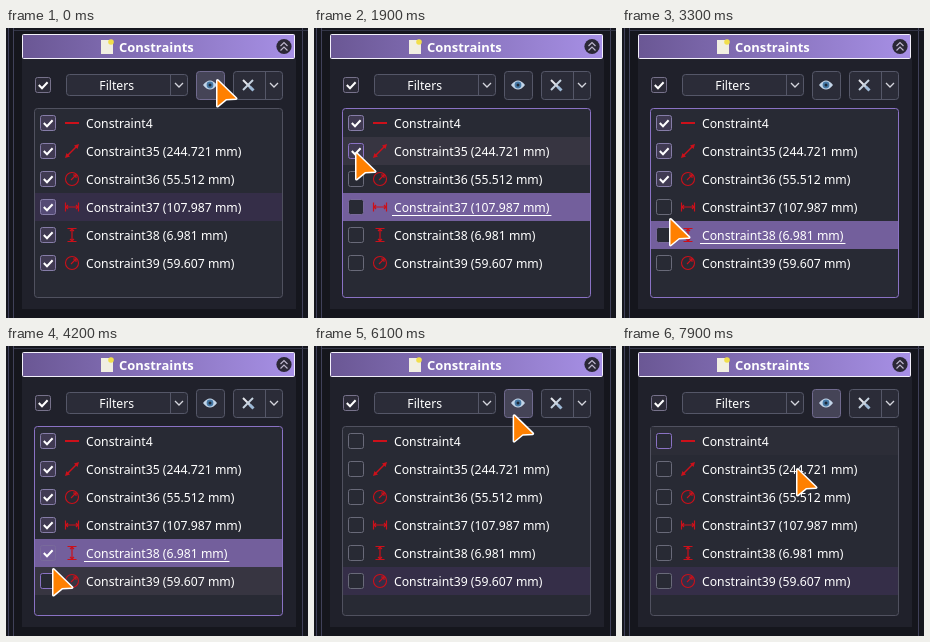
These frames come from a looping animation (302 by 290 pixels, 8 s). An HTML page with a canvas:

```html
<!DOCTYPE html>
<html>
<head>
<meta charset="utf-8">
<style>
html, body { margin: 0; width: 302px; height: 290px; overflow: hidden; background: #15161d; }
canvas { display: block; }
</style>
</head>
<body>
<canvas id="stage" width="302" height="290"></canvas>
<script>
const c = document.getElementById('stage').getContext('2d');
const LOOP = 8000, TOP = 81, ROW = 28, GLIDE = 300;
const FONT = '"Noto Sans", "Open Sans", sans-serif';
const RED = '#cc101a', ACCENT = '#8a72c4';

const rows = [
  { text: 'Constraint4', icon: 'line', on: 1500 },
  { text: 'Constraint35 (244.721 mm)', icon: 'distance', on: 1900 },
  { text: 'Constraint36 (55.512 mm)', icon: 'radius', on: 2800 },
  { text: 'Constraint37 (107.987 mm)', icon: 'width', on: 3500 },
  { text: 'Constraint38 (6.981 mm)', icon: 'height', on: 3800 },
  { text: 'Constraint39 (59.607 mm)', icon: 'radius', on: 4400 }
];

// Where the pointer rests: arrival time, x, y. It glides in between.
const stops = [
  [0, 211, 51], [400, 202, 58], [1000, 120, 75], [1400, 35, 95], [1900, 42, 124],
  [2300, 47, 149], [2900, 48, 193], [3500, 48, 181], [3800, 48, 204], [4100, 47, 222],
  [5100, 49, 228], [5600, 139, 140], [5900, 203, 57], [6300, 190, 100], [6600, 203, 57],
  [6800, 229, 17], [7000, 215, 50], [7200, 195, 95], [7500, 203, 57], [7900, 175, 122]
];

function pointer(t) {
  const i = stops.findIndex(s => s[0] >= t);
  if (i < 1) return stops.at(i).slice(1);
  const [t0, x0, y0] = stops[i - 1], [t1, x1, y1] = stops[i];
  const k = Math.max(0, 1 - (t1 - t) / Math.min(GLIDE, t1 - t0));
  const ease = k * k * (3 - 2 * k);
  return [x0 + (x1 - x0) * ease, y0 + (y1 - y0) * ease];
}

function rowAt(t) {
  const [x, y] = pointer(Math.max(0, t));
  const i = Math.floor((y - TOP) / ROW);
  return x > 29 && x < 276 && rows[i] ? i : -1;
}

function box(x, y, w, h, r, fill, stroke) {
  c.beginPath();
  c.roundRect(x + .5, y + .5, w - 1, h - 1, r);
  c.fillStyle = fill;
  c.fill();
  c.strokeStyle = stroke;
  c.lineWidth = 1;
  c.stroke();
}

function rect(x, y, w, h, fill) {
  c.fillStyle = fill;
  c.fillRect(x, y, w, h);
}

function disc(x, y, r, fill) {
  c.beginPath();
  c.arc(x, y, r, 0, 7);
  c.fillStyle = fill;
  c.fill();
}

function draw(d, color, width = 1.3) {
  c.strokeStyle = color;
  c.lineWidth = width;
  c.stroke(new Path2D(d));
}

function shape(d, fill) {
  c.fillStyle = fill;
  c.fill(new Path2D(d));
}

function at(x, y, fn) {
  c.save();
  c.translate(x, y);
  fn();
  c.restore();
}

function label(text, x, y, font = '12.22px ') {
  c.font = font + FONT;
  c.fillStyle = '#fff';
  c.fillText(text, x, y);
}

function checkbox(x, y, on, fill, border) {
  box(x, y, 16, 16, 2, fill, border);
  if (on) at(x, y, () => draw('M3.8 8L7 11.2L12.6 5.2', '#fff', 2));
}

const icons = {
  line: () => draw('M-7 0H7', RED, 2),
  distance: () => {
    draw('M-5.5 5.5L5.5 -5.5', RED, 1.5);
    shape('M7 -7L5.5 -2L2 -5.5ZM-7 7L-5.5 2L-2 5.5Z', RED);
  },
  radius: () => draw('M6.5 0A6.5 6.5 0 1 1 -6.5 0A6.5 6.5 0 1 1 6.5 0M-1 1L4 -4M1 -4H4V-1', RED, 1.1),
  width: () => draw('M-6.5 -4.5V4.5M6.5 -4.5V4.5M-6 0H6M-4 -2L-6 0L-4 2M4 -2L6 0L4 2', RED, 1.2),
  height: () => draw('M-4.5 -6.5H4.5M-4.5 6.5H4.5M0 -6V6M-2 -4L0 -6L2 -4M-2 4L0 6L2 4', RED, 1.2)
};

function header(hovered) {
  const g = c.createLinearGradient(16, 0, 289, 0);
  g.addColorStop(0, hovered ? '#7c68ab' : '#6a5794');
  g.addColorStop(1, '#a790e6');
  box(16, 6, 273, 25, 1, g, '#f3f0fb');
  rect(95, 12, 12, 14, '#f1efe2');
  disc(105, 14, 2.8, '#f2df4c');
  label('Constraints', 113, 23.5, 'bold 12.95px ');
  disc(278, 18.5, 7.6, '#2b2836');
  draw('M274.5 18L278 14.5L281.5 18M274.5 22.5L278 19L281.5 22.5', '#bdb6cc', 1.2);
}

function toolbar(eyeActive) {
  const fill = '#2b2c38', edge = '#555768', chevron = 'M-4 -2L0 2L4 -2';
  checkbox(29, 49, true, '#2c2b38', '#77728b');
  box(60, 46, 122, 22, 3, fill, edge);
  rect(164, 47, 1, 20, edge);
  label('Filters', 93.3, 61.5);
  at(173, 57, () => draw(chevron, '#d5d6de'));
  box(190, 43, 29, 29, 3, eyeActive ? '#454457' : fill, eyeActive ? '#706a8e' : edge);
  at(204, 57, () => {
    shape('M-7 0Q0 -9 7 0Q0 9 -7 0Z', '#c3d5e8');
    disc(0, 0, 3.4, '#4679a6');
    disc(0, 0, 1.5, '#1d2a3a');
  });
  box(227, 43, 50, 29, 3, fill, edge);
  rect(259, 44, 1, 27, edge);
  at(242, 57, () => {
    draw('M-5 -5L5 5', '#e4e6eb', 2);
    draw('M5 -5L-5 5', '#c6d3e0', 2);
    draw('M1.5 1.5L5.5 5.5', '#9db9d6', 3);
  });
  at(268, 57, () => draw(chevron, '#d5d6de'));
}

function list(t) {
  const focused = t >= 1400 && t < 5900;
  const active = t >= 1500 && t < 5900;
  const selected = t < 3100 ? 3 : t < 4400 ? 4 : 5;
  const hover = rowAt(t - 100);
  box(28, 80, 249, 190, 3, '#282a34', focused ? ACCENT : '#50515f');

  rows.forEach((row, i) => {
    const y = TOP + i * ROW, mid = y + 14;
    const current = i === selected, bright = current && active;
    const on = t < 600 || (t >= row.on && t < 5900) || (t >= 6600 && t < 7700);
    if (current) rect(29, y, 247, ROW, active ? '#735f9c' : '#352e48');
    else if (i === hover) rect(29, y, 247, ROW, active ? '#373541' : '#2c2d37');

    const fill = !on ? '#282a34' : bright ? '#735f9c' : current ? '#544a75' : '#403a52';
    const edge = bright ? '#796a9b' : i === hover ? ACCENT : on ? '#867da8' : '#696a79';
    checkbox(34, y + 6, on, fill, edge);
    at(66, mid, icons[row.icon]);
    label(row.text, 80, mid + 4.5);
    if (bright) rect(78, y + 22, c.measureText(row.text).width + 4, 1, '#fff');
  });
}

function cursor(x, y, hand) {
  const d = hand
    ? 'M-2 1Q0 -2 2 1L3 9L9 10Q13 11 13 15L11 20V24H-1V21L-9 14Q-10 10 -6 11L-1 14Z'
    : 'M.5 1.5L19 19.5L9 20L.5 27Z';
  at(x, y, () => {
    if (hand) c.scale(1.06, 1.06);
    c.lineJoin = 'round';
    draw(d, '#fff', 3);
    shape(d, '#ff8000');
  });
}

function render(t) {
  const [x, y] = pointer(t);
  const overHeader = y > 6 && y < 31;
  rect(0, 0, 302, 290, '#15161d');
  for (const line of [2, 7, 296]) rect(line, 0, 1, 290, '#404159');
  rect(8, 2, 294, 1, '#333546');
  rect(16, 31, 274, 250, '#20212b');
  header(overHeader);
  toolbar(t < 1400 || t >= 5900);
  list(t);
  cursor(x, y, overHeader);
}

function tick() {
  // The picture advances in steps of a tenth of a second.
  render(Math.floor(performance.now() % LOOP / 100) * 100);
  requestAnimationFrame(tick);
}
tick();
</script>
</body>
</html>
```
